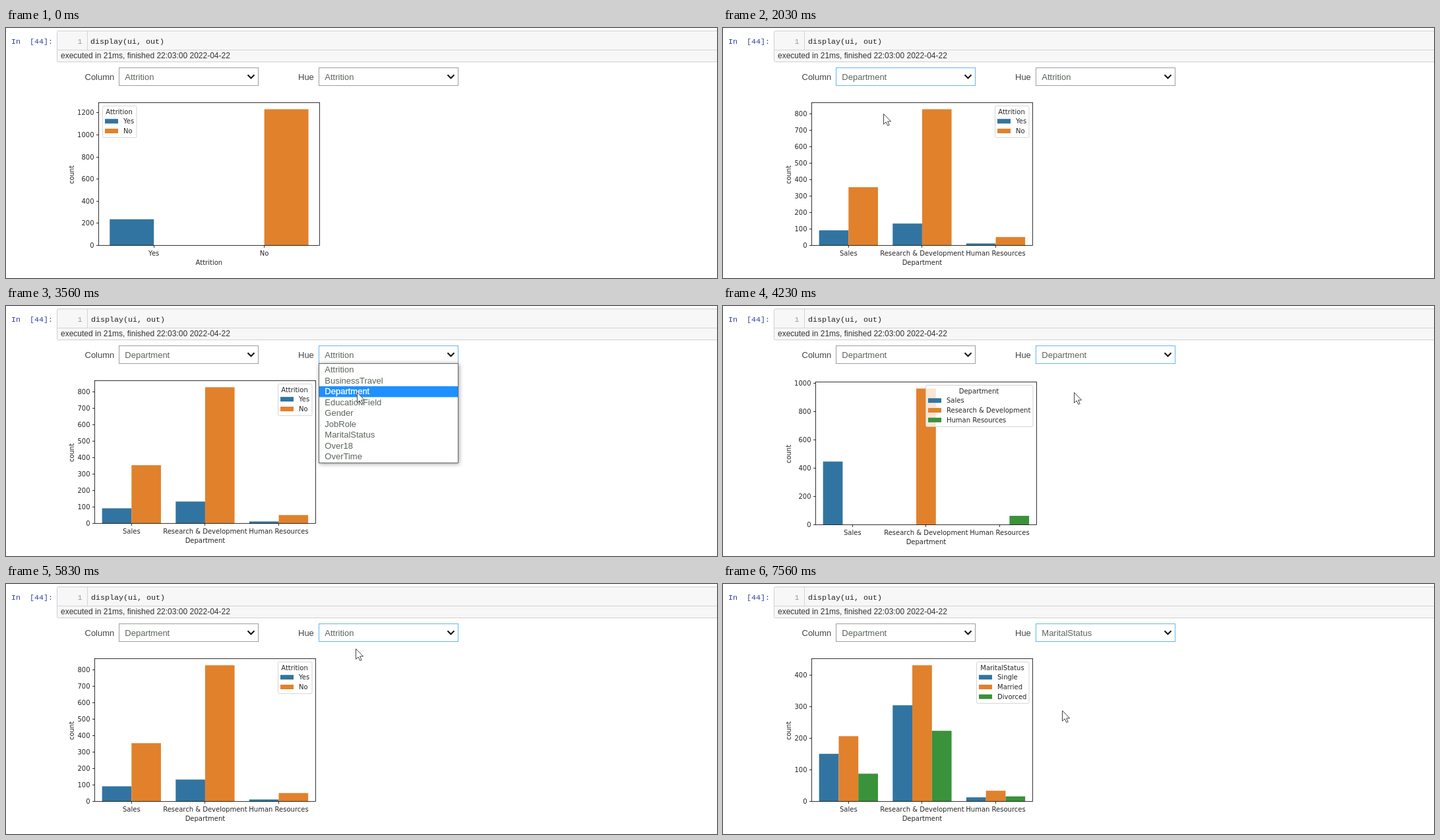
An HTML page that plays this animation: 1078x380 px, repeating every 8 s.

```html
<!DOCTYPE html>
<html lang="en">
<head>
<meta charset="utf-8">
<title>Count plot explorer</title>
<style>
  html, body { margin: 0; width: 100%; height: 100%; overflow: hidden; background: #fff; }
  svg { display: block; width: 1078px; height: 380px; }
  text { white-space: pre; }
  .ui { font: 13px "Liberation Sans", Arial, sans-serif; }
  .exec { font: 12px "Liberation Sans", Arial, sans-serif; }
  .code { font: 11.67px "Liberation Mono", monospace; }
  .plot { font: 10px "DejaVu Sans", sans-serif; fill: #262626; }
  .list { filter: drop-shadow(1px 1px 3px rgba(0, 0, 0, .4)); }
</style>
</head>
<body>
<svg id="stage" viewBox="0 0 1078 380"></svg>
<script>
const LOOP = 8000, TICK = 200 / 3;
const stage = document.getElementById('stage');
const COLORS = ['#3274a1', '#e1812c', '#3a923a'];
const FIELDS = ['Attrition', 'BusinessTravel', 'Department', 'EducationField', 'Gender',
  'JobRole', 'MaritalStatus', 'Over18', 'OverTime'];
const TEAMS = ['Sales', 'Research & Development', 'Human Resources'];
const ROW = 16.6, LIST_TOP = 88.5;
const INK = '#5a645a';

function add(parent, tag, attrs = {}, text) {
  const el = document.createElementNS('http://www.w3.org/2000/svg', tag);
  for (const k in attrs) el.setAttribute(k, attrs[k]);
  if (text !== undefined) el.textContent = text;
  parent.appendChild(el);
  return el;
}
const rect = (p, x, y, width, height, fill, more) =>
  add(p, 'rect', { x, y, width, height, fill, ...more });
const line = (p, d, stroke, width = 1) =>
  add(p, 'path', { d, stroke, fill: 'none', 'stroke-width': width });
const label = (p, cls, x, y, str, more) => add(p, 'text', { class: cls, x, y, ...more }, str);
const show = (el, on) => el.setAttribute('visibility', on ? 'visible' : 'hidden');

// Notebook cell
rect(stage, 77.5, 4.5, 1010, 47, '#f7f7f7', { stroke: '#cfcfcf', rx: 2 });
line(stage, 'M78 33.5H1078M123.5 5V33', '#d4d4d4');
label(stage, 'code', 8, 24, 'In  [44]:', { fill: '#303f9f' });
label(stage, 'code', 108.5, 24, '1', { fill: '#999' });
const code = label(stage, 'code', 128, 24, 'display(ui, out)', { fill: '#222' });
label(stage, 'exec', 83, 46, 'executed in 21ms, finished 22:03:00 2022-04-22', { fill: '#333' });

// Count plots: values[category][hue]
const CHARTS = [
  { left: 140.5, base: 330.5, xlabel: 'Attrition', cats: ['Yes', 'No'], hues: ['Yes', 'No'],
    values: [[237, 0], [0, 1233]], step: 200, box: [146, 52] },
  { left: 134.5, base: 330.5, xlabel: 'Department', title: 'Attrition', cats: TEAMS, hues: ['Yes', 'No'],
    values: [[92, 354], [133, 828], [12, 51]], step: 100, box: [412, 52] },
  { left: 140.5, base: 332.5, xlabel: 'Department', cats: TEAMS, hues: TEAMS,
    values: [[446, 0, 0], [0, 961, 0], [0, 0, 63]], step: 200, box: [307, 163] },
  { left: 134.5, base: 330.5, xlabel: 'Department', title: 'MaritalStatus', cats: TEAMS,
    hues: ['Single', 'Married', 'Divorced'],
    values: [[151, 207, 88], [305, 432, 224], [13, 34, 16]], step: 100, box: [384, 80] }
];

function drawChart(c) {
  const g = add(stage, 'g');
  const max = Math.max(...c.values.flat()) * 1.05;
  const unit = 334.8 / c.cats.length, bar = unit * 0.8 / c.hues.length;
  const mid = { 'text-anchor': 'middle' };

  c.cats.forEach((name, i) => {
    const x = c.left + unit * (i + 0.5);
    c.values[i].forEach((v, k) => {
      const h = v / max * 217.4;
      if (v) rect(g, x + bar * (k - c.hues.length / 2), c.base - h, bar, h, COLORS[k]);
    });
    line(g, `M${Math.floor(x) + 0.5} ${c.base}v3.5`, '#000', 0.8);
    label(g, 'plot', x, c.base + 15.5, name, mid);
  });
  for (let v = 0; v <= max; v += c.step) {
    const y = Math.floor(c.base - v / max * 217.4) + 0.5;
    line(g, `M${c.left} ${y}h-3.5`, '#000', 0.8);
    label(g, 'plot', c.left - 7, y + 3.6, v, { 'text-anchor': 'end' });
  }
  rect(g, c.left, c.base - 217, 335, 217, 'none', { stroke: '#000', 'stroke-width': 0.8 });
  label(g, 'plot', c.left + 167.4, c.base + 29.5, c.xlabel, mid);
  label(g, 'plot', 0, 0, 'count', { ...mid, transform: `translate(103 ${c.base - 107.5}) rotate(-90)` });

  const [x, w] = c.box, top = c.base - 212.5;
  rect(g, x + 0.5, top + 0.5, w - 0.5, 18.5 + 14.8 * c.hues.length, '#fff',
    { 'fill-opacity': 0.8, stroke: '#ccc', 'stroke-opacity': 0.8, rx: 2 });
  label(g, 'plot', x + w / 2 - 0.5, top + 12.7, c.title || c.xlabel, mid);
  c.hues.forEach((name, k) => {
    const y = top + 20.2 + 14.8 * k;
    rect(g, x + 4, y, 20, 7, COLORS[k]);
    label(g, 'plot', x + 32, y + 7.1, name);
  });
  return g;
}
const charts = CHARTS.map(drawChart);

// Dropdowns
function drawSelect(x, name, nameX) {
  label(stage, 'ui', nameX, 79, name, { fill: '#444' });
  const frame = rect(stage, x + 0.5, 60.5, 211, 27, '#fff');
  const value = label(stage, 'ui', x + 9.3, 79, '', { fill: INK });
  line(stage, `M${x + 195.5} 71.3l5 5l5 -5`, '#111', 2);
  return { x, frame, value };
}
function drawList(s) {
  s.list = add(stage, 'g', { class: 'list' });
  rect(s.list, s.x + 0.5, 87.5, 211, 151, '#fff', { stroke: '#666' });
  s.mark = rect(s.list, s.x + 1, 88, 210, 16.5, '#1e90ff');
  s.items = FIELDS.map((f, i) => label(s.list, 'ui', s.x + 9.3, 101 + 16.55 * i, f));
}
const selects = {
  col: drawSelect(171, 'Column', 119.5),
  hue: drawSelect(474, 'Hue', 443)
};
Object.values(selects).forEach(drawList);

const pointer = add(stage, 'path', {
  d: 'M.5 .5V16.3L4.1 12.9L6.8 18.5L9.2 17.4L6.6 12H11.6Z',
  fill: '#fff', stroke: '#444', 'stroke-width': 1, 'stroke-linejoin': 'round'
});

// [ms, changes]
const EVENTS = [
  [0, { chart: 0, col: 'Attrition', hue: 'Attrition', focus: '', open: '', codeX: 128 }],
  [1100, { focus: 'col', open: 'col', codeX: 129 }],
  [1900, { open: '', col: 'Department' }],
  [2030, { chart: 1 }],
  [2960, { focus: 'hue', open: 'hue' }],
  [3760, { open: '', hue: 'Department' }],
  [4230, { chart: 2 }],
  [4830, { open: 'hue' }],
  [5630, { open: '', hue: 'Attrition' }],
  [5830, { chart: 1 }],
  [6560, { open: 'hue' }],
  [7430, { open: '', hue: 'MaritalStatus' }],
  [7560, { chart: 3 }]
];

const EASE = {
  both: u => u * u * (3 - 2 * u),
  in: u => u ** 1.5,
  out: u => 1 - (1 - u) ** 1.5
};
// [ms, x, y, easing on the way there]
const PATH = [
  [433, 205, -20], [900, 217, 65, 'out'],
  [1033, 217, 65], [1433, 241, 99, 'in'], [1700, 243, 130, 'out'],
  [2233, 243, 130], [2833, 533, 84, 'both'],
  [3033, 533, 84], [3566, 532, 131, 'both'],
  [4300, 532, 131], [4633, 538, 73, 'both'],
  [4900, 538, 73], [5233, 530, 98, 'both'],
  [6166, 530, 98], [6366, 535, 76, 'both'],
  [6500, 535, 76], [6900, 515, 162, 'in'], [7233, 514, 192, 'out']
];

function pointAt(t) {
  const i = PATH.findIndex(p => p[0] > t);
  if (i < 0) return PATH[PATH.length - 1].slice(1, 3);
  if (i === 0) return PATH[0].slice(1, 3);
  const a = PATH[i - 1], b = PATH[i];
  const u = (EASE[b[3]] || (v => v))((t - a[0]) / (b[0] - a[0]));
  return [1, 2].map(k => Math.round(a[k] + (b[k] - a[k]) * u));
}

function render(now) {
  const t = 100 + Math.floor((now - 93) / TICK) * TICK + 0.5;
  const s = {};
  for (const [at, change] of EVENTS) if (at <= Math.max(t, 0)) Object.assign(s, change);
  const [px, py] = pointAt(t);

  code.setAttribute('x', s.codeX);
  charts.forEach((g, i) => show(g, i === s.chart));
  for (const key in selects) {
    const el = selects[key], open = s.open === key;
    el.frame.setAttribute('stroke', s.focus === key ? '#64b5f6' : '#9e9e9e');
    el.value.textContent = s[key];
    show(el.list, open);
    if (!open) continue;
    const under = Math.floor((py + 6.5 - LIST_TOP) / ROW);
    const pick = under >= 0 ? under : FIELDS.indexOf(s[key]);
    el.mark.setAttribute('y', Math.round(LIST_TOP + ROW * pick - 0.1));
    el.items.forEach((item, i) => {
      item.setAttribute('fill', i === pick ? '#fff' : INK);
      item.setAttribute('stroke', i === pick ? '#fff' : 'none');
      item.setAttribute('stroke-width', 0.3);
    });
  }
  pointer.setAttribute('transform', `translate(${px} ${py})`);
}

const start = performance.now();
function frame() {
  render((performance.now() - start) % LOOP);
  requestAnimationFrame(frame);
}
frame();
</script>
</body>
</html>
```
